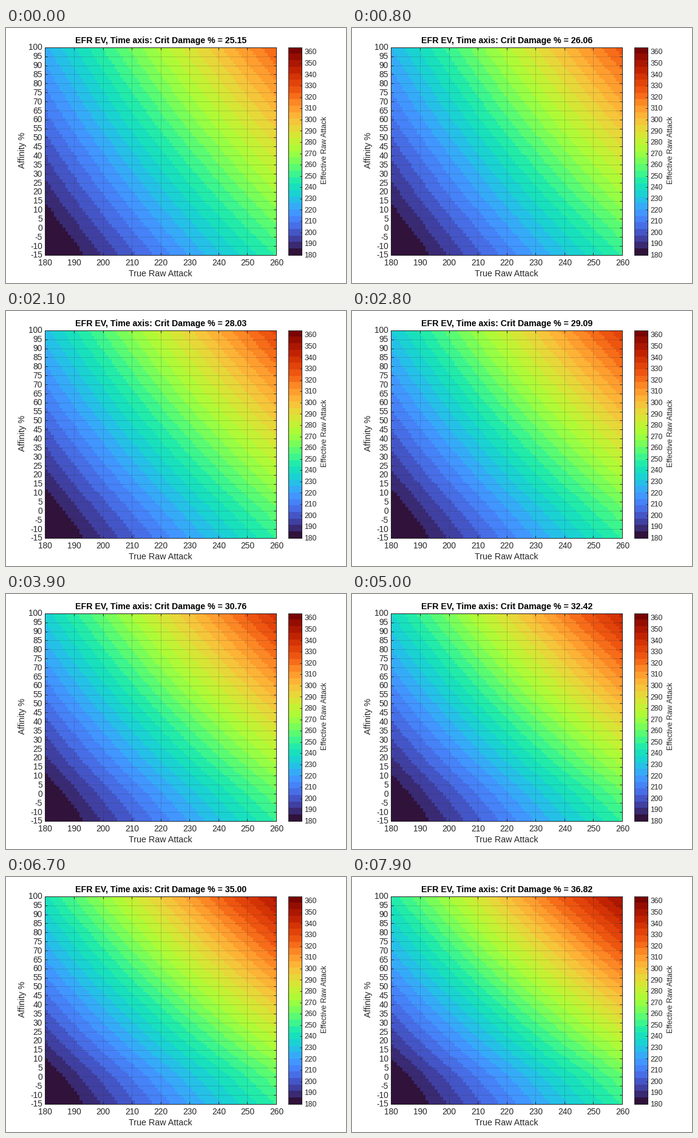
A matplotlib script for the animation above (8 s loop, 560x420 px).

```python
import matplotlib.pyplot as plt
import numpy as np
from matplotlib.animation import FuncAnimation

W, H, DPI = 560, 420, 100
PX = 72 / DPI  # points per pixel
INK = "#262626"
STEP_MS, TICKS = 100, 80
LOW, HIGH, LEVELS = 180, 364, 32

plt.rcParams["font.family"] = "Liberation Sans"
fig = plt.figure(figsize=(W / DPI, H / DPI), dpi=DPI, facecolor="white")
cmap = plt.get_cmap("turbo").resampled(LEVELS)


def make_axes(left, top, right, bottom):
    ax = fig.add_axes([left / W, 1 - bottom / H, (right - left) / W, (bottom - top) / H])
    for spine in ax.spines.values():
        spine.set(color=INK, linewidth=PX)
    ax.set_axisbelow(False)
    return ax


def label(x, y, text, size, color=INK, **kw):
    return fig.text(x / W, 1 - y / H, text, fontsize=size * PX, color=color,
                    va="baseline", rotation_mode="anchor", **kw)


def show(ax, x_edges, y_edges, data):
    mesh = ax.pcolormesh(x_edges, y_edges, data, cmap=cmap, vmin=LOW, vmax=HIGH,
                         antialiased=False, linewidth=0)
    ax.set_xlim(x_edges[0], x_edges[-1])
    ax.set_ylim(y_edges[0], y_edges[-1])
    return mesh


# Each cell takes the value at its lower-left corner.
x_edges, y_edges = np.arange(180, 261), np.arange(-15, 101)
raw, affinity = np.meshgrid(x_edges[:-1], y_edges[:-1] / 100)


def effective_raw(crit):
    return raw * (1 + affinity * np.where(affinity < 0, 0.25, crit / 100))


def crit_damage(tick):
    # The first two values are held for two ticks each.
    step = tick // 2 if tick < 4 else tick - 2
    return 25 + (step + 1) * 15 / 99


# Heat map
L, T, R, B = 64.4, 31.8, 444.9, 373.8
ax = make_axes(L, T, R, B)
heat = show(ax, x_edges, y_edges, effective_raw(25))
x_ticks, y_ticks = x_edges[::10], y_edges[::5]
ax.set_xticks(x_ticks)
ax.set_yticks(y_ticks)
ax.tick_params(direction="in", length=4 * PX, width=PX, color=INK, top=True, right=True,
               labelbottom=False, labelleft=False)
ax.grid(color=INK, alpha=0.18, linewidth=PX)
for v in x_ticks:
    label(L + (v - 180) / 80 * (R - L) + 0.5, 391, str(v), 13.8, ha="center")
for v in y_ticks:
    label(60, B - (v + 15) / 115 * (B - T) + 4.7, str(v), 13.8, ha="right")

# Colour bar
bar = make_axes(464.8, T, 486.9, B)
levels = np.linspace(LOW, HIGH, LEVELS + 1)
show(bar, np.array([0, 1]), levels, (levels[:-1, None] + levels[1:, None]) / 2)
bar_ticks = np.arange(180, 361, 10)
bar.set_xticks([])
bar.set_yticks(bar_ticks)
bar.tick_params(direction="in", length=3 * PX, width=PX, color=INK, left=False, right=True,
                labelleft=False)
for v in bar_ticks:
    label(491.5, B - (v - LOW) / (HIGH - LOW) * (B - T) + 4.2, str(v), 12.3)

label(254.6, 409, "True Raw Attack", 14.2, ha="center")
label(31.5, 201.5, "Affinity %", 14.2, ha="center", rotation=90)
label(528, 201.5, "Effective Raw Attack", 12.2, ha="center", rotation=90)
title = label(255, 25, "", 14.15, color="black", ha="center", weight="bold")


def update(tick):
    crit = crit_damage(tick)
    heat.set_array(effective_raw(crit))
    title.set_text(f"EFR EV, Time axis: Crit Damage % = {crit:.2f}")
    return heat, title


anim = FuncAnimation(fig, update, frames=TICKS, interval=STEP_MS, repeat=True,
                     repeat_delay=0, blit=False)
plt.show()
```
